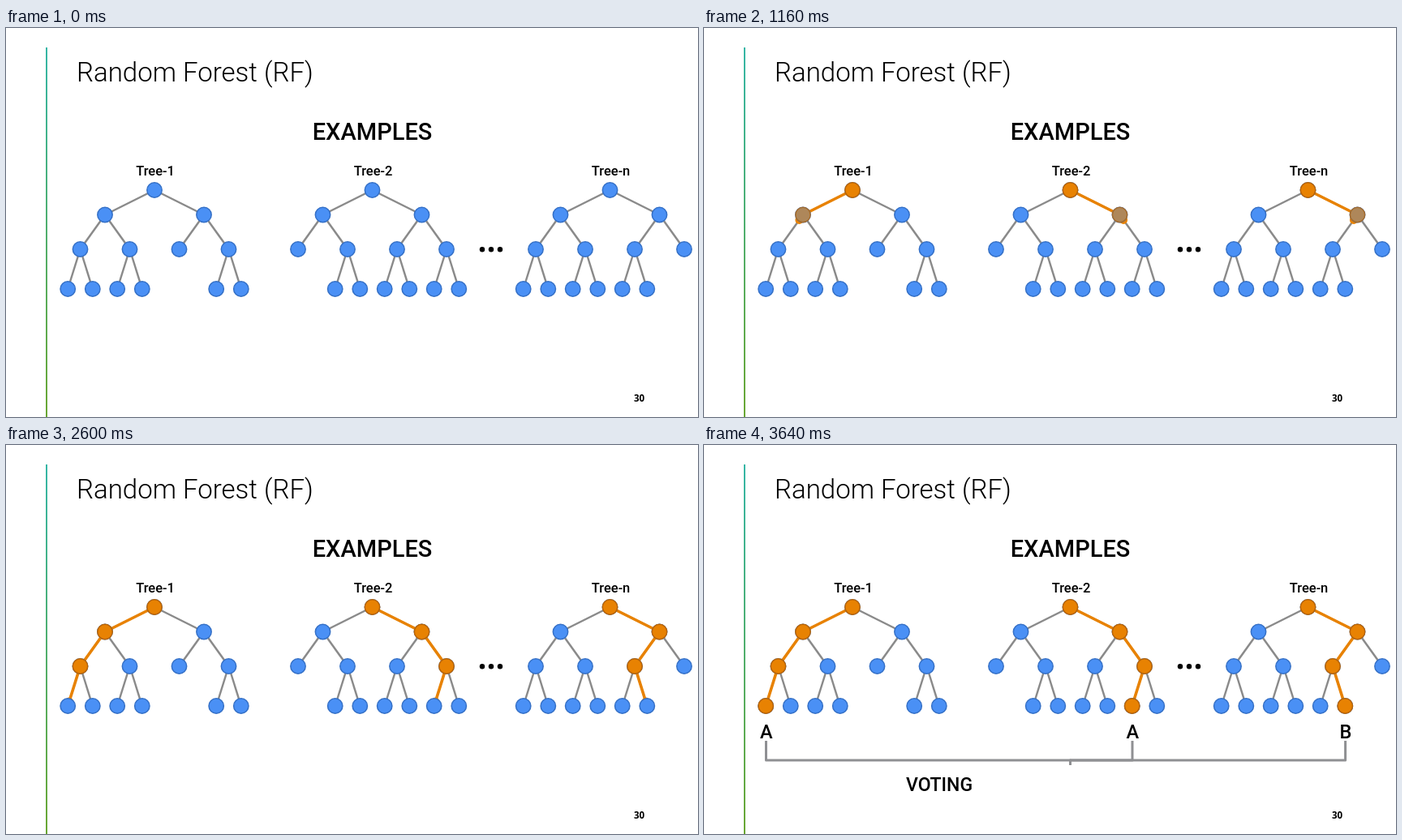
These frames come from a looping animation (853x480 px, 3.7 s). An HTML page with a canvas:

```html
<!DOCTYPE html>
<html lang="en">
<head>
<meta charset="utf-8">
<title>Random Forest</title>
<style>
html, body { margin: 0; width: 100%; height: 100%; overflow: hidden; background: #fff; }
canvas { display: block; }
</style>
</head>
<body>
<canvas id="stage" width="853" height="480"></canvas>
<script>
const ctx = document.getElementById('stage').getContext('2d');
const LOOP = 3700, STEP = 60;
const BLUE = ['#4a90f5', '#3570c6'];
const ORANGE = ['#e88202', '#bb6503'];
const LEVEL_Y = [200, 230.5, 273, 322];
const SPREAD = [61, 30.5, 15.3];
const MOVE_START = [225, 1040, 1890];
const MOVE_TIME = 800;
const LIGHT_START = [170, 1020, 1850, 2680];
const LIGHT_TIME = 220;
const JOIN = { x: 451.5, y: 389 };

// bare: index of the third-level node without children; route: 0 left, 1 right
const trees = [
  { name: 'Tree-1', x: 183, bare: 2, route: [0, 0, 0], vote: 'A' },
  { name: 'Tree-2', x: 451.5, bare: 0, route: [1, 1, 0], vote: 'A' },
  { name: 'Tree-n', x: 744.5, bare: 3, route: [1, 0, 1], vote: 'B' }
];

const clamp = v => Math.max(0, Math.min(1, v));
const mix = (a, b, p) => ({ x: a.x + (b.x - a.x) * p, y: a.y + (b.y - a.y) * p });

function child(node, side) {
  const { level, index } = node;
  return {
    x: node.x + (side ? 1 : -1) * SPREAD[level],
    y: LEVEL_Y[level + 1],
    level: level + 1,
    index: index * 2 + side
  };
}

for (const tree of trees) {
  const root = { x: tree.x, y: LEVEL_Y[0], level: 0, index: 0 };
  tree.nodes = [];
  tree.edges = [];
  const grow = node => {
    tree.nodes.push(node);
    if (node.level === 3 || (node.level === 2 && node.index === tree.bare)) return;
    for (const side of [0, 1]) {
      const next = child(node, side);
      tree.edges.push([node, next]);
      grow(next);
    }
  };
  grow(root);
  tree.path = [root];
  for (const side of tree.route) tree.path.push(child(tree.path.at(-1), side));
}

function line(a, b, color, width) {
  ctx.strokeStyle = color;
  ctx.lineWidth = width;
  ctx.beginPath();
  ctx.moveTo(a.x, a.y);
  ctx.lineTo(b.x, b.y);
  ctx.stroke();
}

function disc(x, y, r, color) {
  ctx.fillStyle = color;
  ctx.beginPath();
  ctx.arc(x, y, r, 0, Math.PI * 2);
  ctx.fill();
}

function drawNode({ x, y }, [fill, rim], alpha = 1) {
  ctx.globalAlpha = alpha;
  disc(x, y, 9.2, fill);
  ctx.strokeStyle = rim;
  ctx.lineWidth = 1.5;
  ctx.stroke();
  ctx.globalAlpha = 1;
}

function text(str, x, y, font, align = 'center', alpha = 1) {
  ctx.globalAlpha = alpha;
  ctx.fillStyle = '#000';
  ctx.font = font;
  ctx.textAlign = align;
  ctx.fillText(str, x, y);
  ctx.globalAlpha = 1;
}

const label = (str, x, y, size, alpha) =>
  text(str, x, y, `500 ${size}px Roboto, sans-serif`, 'center', alpha);

function drawSlide() {
  ctx.fillStyle = '#fff';
  ctx.fillRect(0, 0, 853, 480);
  const shade = ctx.createLinearGradient(0, 24, 0, 480);
  shade.addColorStop(0, '#35b6a6');
  shade.addColorStop(1, '#6aa733');
  ctx.fillStyle = shade;
  ctx.fillRect(49, 24, 2, 456);
  text('Random Forest (RF)', 87, 66, '300 33px Roboto, sans-serif', 'left');
  label('EXAMPLES', 451.5, 138, 29);
  for (const x of [587, 598, 609]) disc(x, 273.3, 3.2, '#000');
  text('30', 774, 461, 'bold 11.5px "Open Sans", sans-serif', 'left');
}

function drawTree(tree, t) {
  label(tree.name, tree.x + 1, 181.5, 16.5);
  for (const [a, b] of tree.edges) line(a, b, '#8a8a8a', 2.5);
  MOVE_START.forEach((start, i) => {
    const p = clamp((t - start) / MOVE_TIME);
    if (!p) return;
    const tip = mix(tree.path[i], tree.path[i + 1], p);
    line(tree.path[i], tip, ORANGE[0], 3.6);
    if (p < 1) disc(tip.x, tip.y, 5, ORANGE[0]);
  });
  for (const node of tree.nodes) drawNode(node, BLUE);
  tree.path.forEach((node, i) => {
    const alpha = clamp((t - LIGHT_START[i]) / LIGHT_TIME);
    if (alpha) drawNode(node, ORANGE, alpha);
  });
  label(tree.vote, tree.path[3].x + 0.5, 361.5, 23.5, clamp((t - 2720) / 180));
}

function drawBracket(x, p) {
  const drop = 24, stub = 6;
  const total = drop + Math.abs(x - JOIN.x) + stub;
  ctx.strokeStyle = '#8f9093';
  ctx.lineWidth = 3;
  ctx.lineJoin = 'round';
  ctx.setLineDash([total * p, total * 2]);
  ctx.beginPath();
  ctx.moveTo(x, JOIN.y - drop);
  ctx.lineTo(x, JOIN.y);
  ctx.lineTo(JOIN.x, JOIN.y);
  ctx.lineTo(JOIN.x, JOIN.y + stub);
  ctx.stroke();
  ctx.setLineDash([]);
}

// The picture advances in 60 ms steps, with a rest at the start and before the vote.
function stepTime(t) {
  if (t < 200) return 0;
  if (t < 3100) return Math.min(2900, 200 + Math.floor((t - 200) / STEP) * STEP);
  return 3100 + Math.floor((t - 3100) / STEP) * STEP;
}

function draw(now) {
  const t = stepTime(now % LOOP);
  drawSlide();
  for (const tree of trees) drawTree(tree, t);
  if (t >= 3100) {
    const p = clamp((t - 3040) / 600);
    for (const tree of trees) drawBracket(tree.path[3].x + 0.3, p);
    label('VOTING', 290, 426.5, 23, clamp(p * 1.2));
  }
}

let begin;
function tick(now) {
  begin ??= now;
  draw(now - begin);
  requestAnimationFrame(tick);
}
draw(0);
requestAnimationFrame(tick);
</script>
</body>
</html>
```
